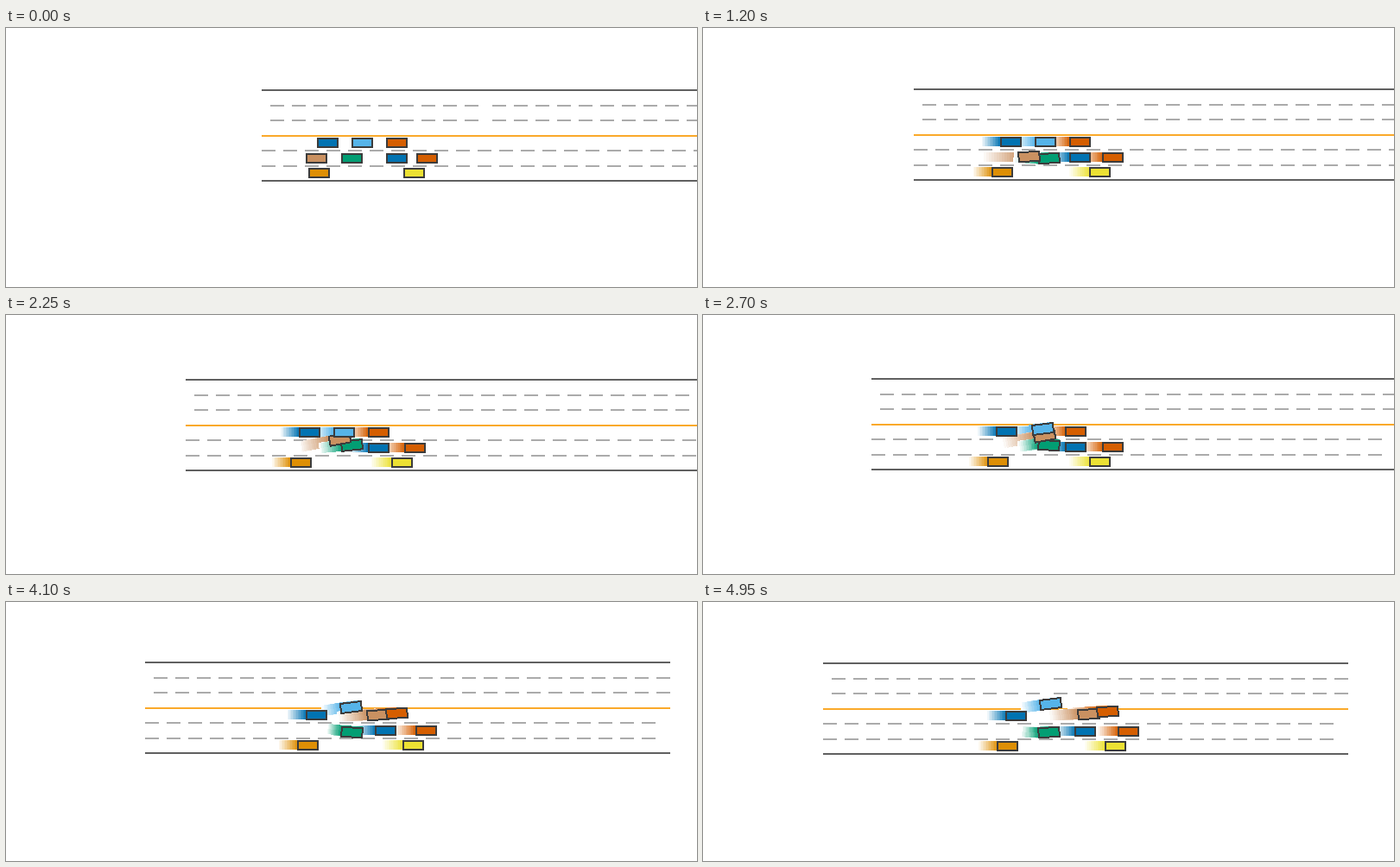
A matplotlib script for the animation above (5000 ms loop, 800 px wide and 300 px high).

```python
import numpy as np
import matplotlib.pyplot as plt
from matplotlib.animation import FuncAnimation
from matplotlib.collections import PolyCollection
from matplotlib.colors import to_rgb

W, H, DPI = 800, 300, 100
FRAMES, STEP = 100, 50
TRAIL = 15
CAR_L, CAR_W = 25, 12
ROAD = 608
DASH_GAP = 25
EDGE, DASH, MEDIAN, BORDER = "#606060", "#ababab", "#faa92a", "#3c3c3c"
BLUE, ORANGE, GREEN, RED = "#0173b2", "#de8f05", "#029e73", "#d55e00"
TAN, YELLOW, SKY = "#ca9161", "#ece133", "#56b4e9"
TOP_LANE, MID_LANE, LOW_LANE = 62, 80, 97
SLOW, FAST = 29.7, 32.7


def keyed(*pairs):
    times, values = zip(*pairs)
    return lambda t: np.interp(t, times, values)


# The camera follows the green car, so the road slides past it.
road_left = keyed((0, 296), (0.55, 267.2), (1.65, 227.9), (2.2, 209),
                  (3.3, 178), (3.85, 167), (4.95, 139))
road_top = keyed((0, 71.4), (0.8, 69.4), (1.2, 70.4), (2.3, 74.3),
                 (2.7, 73.7), (3.3, 71.4), (4.4, 69.2), (4.95, 70.3))


# Each path gives distance along the road, offset from its top, and heading.
def steady(x, speed, lane):
    return lambda t: (x + speed * t, lane, 0)


def struck(x, lane, hit, push, speed, kick, drift, angle):
    def path(t):
        after = t - hit
        if after < 0:
            return x + SLOW * t, lane, 0
        along = x + SLOW * hit + push + speed * after
        return along, lane - kick - drift * after, angle
    return path


def steered(along, offset, span=0.2):
    def path(t):
        before = max(t - span, 0)
        rise = offset(before) - offset(t)
        run = along(t) - along(before)
        return along(t), offset(t), np.degrees(np.arctan2(rise, run))
    return path


CARS = [
    (GREEN, steered(lambda t: 400.5 - road_left(t),
                    lambda t: 151 - road_top(t))),
    (BLUE, steady(76.5, SLOW, TOP_LANE)),
    (BLUE, steady(156.5, SLOW, MID_LANE)),
    (RED, steady(191.5, FAST, MID_LANE)),
    (ORANGE, steady(66.5, SLOW, LOW_LANE)),
    (YELLOW, steady(176.5, FAST, LOW_LANE)),
    (TAN, steered(keyed((0, 63.5), (1.1, 129.5), (1.75, 153.5),
                        (2.7, 200.6), (3.3, 233.5), (4.95, 307)),
                  keyed((1.1, 80), (1.75, 75.5), (2.7, 66.5), (3.3, 63),
                        (4.95, 60)))),
    (SKY, struck(116.5, TOP_LANE, 2.6, 1.9, 28.9, 3, 4.5, 7)),
    (RED, struck(156.5, TOP_LANE, 3.2, 0.6, 44.2, 0, 3, 3.5)),
]


def box(cx, cy, length, height, angle=0):
    a = np.radians(angle)
    along = np.array([np.cos(a), -np.sin(a)]) * length / 2
    across = np.array([np.sin(a), np.cos(a)]) * height / 2
    return np.array([cx, cy]) + [-along - across, along - across,
                                 along + across, across - along]


def bar(x, y, length):
    return box(x + length / 2, y + 1, length, 2)


def fade(color, amount):
    return tuple(1 - (1 - c) * amount for c in to_rgb(color))


def road_shapes(left, top):
    shapes = [(bar(left, top + dy, ROAD), color)
              for dy, color in ((0, EDGE), (53, MEDIAN), (105, EDGE))]
    # The upper half is made of two sections, each with its own dash phase.
    upper = [*range(10, 251, DASH_GAP), *range(267, ROAD, DASH_GAP)]
    lower = range(0, 600, DASH_GAP)
    for rows, starts in (((18, 35), upper), ((70, 88), lower)):
        shapes += [(bar(left + x, top + dy, 16), DASH)
                   for dy in rows for x in starts]
    return shapes


def scene(frame):
    t = frame * STEP / 1000
    left, top = np.round(road_left(t)), road_top(t)

    def pose(path, when):
        along, offset, angle = path(when)
        return (np.floor(left + along) + 0.5,
                np.floor(top + offset + 1e-6), angle)

    shapes = road_shapes(left, np.floor(top))
    for color, path in reversed(CARS):
        for age in range(min(frame, TRAIL), 0, -1):
            x, y, angle = pose(path, t - age * STEP / 1000)
            ghost = box(x, y - 0.5, CAR_L, CAR_W - 1, angle)
            shapes.append((ghost, fade(color, 1 - age / TRAIL)))
    for color, path in CARS:
        x, y, angle = pose(path, t)
        shapes.append((box(x, y, CAR_L, CAR_W, angle), BORDER))
        shapes.append((box(x, y, CAR_L - 4, CAR_W - 4, angle), color))
    return shapes


fig = plt.figure(figsize=(W / DPI, H / DPI), dpi=DPI, facecolor="white")
ax = fig.add_axes([0, 0, 1, 1])
ax.set_xlim(0, W)
ax.set_ylim(H, 0)
ax.axis("off")
layer = PolyCollection([], edgecolors="none", linewidths=0, antialiaseds=False)
ax.add_collection(layer, autolim=False)


def draw(frame):
    verts, colors = zip(*scene(frame))
    layer.set_verts(verts)
    layer.set_facecolor([to_rgb(c) for c in colors])
    return (layer,)


anim = FuncAnimation(fig, draw, frames=FRAMES, interval=STEP, repeat=True)
plt.show()
```
